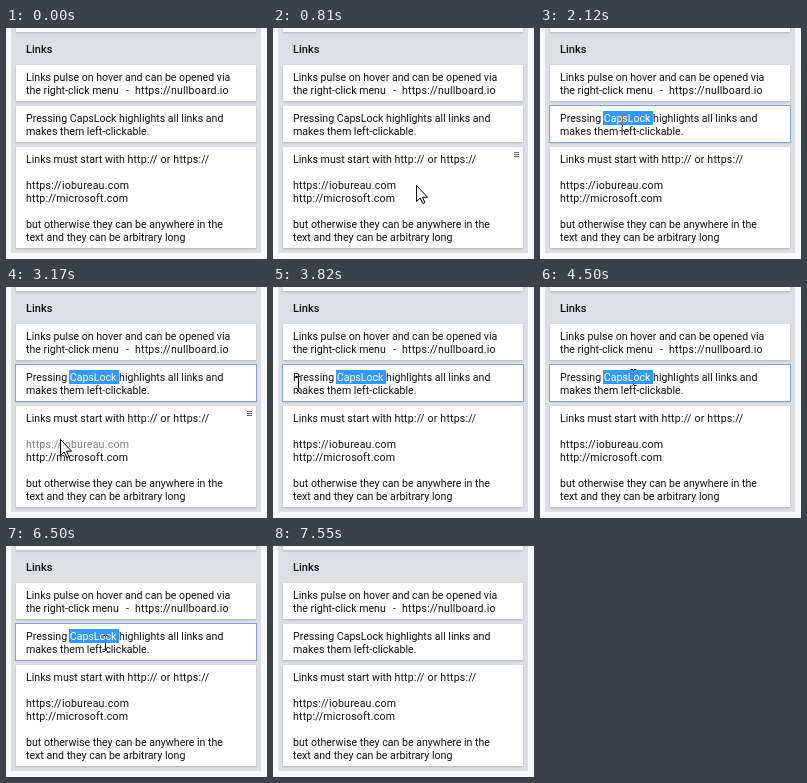
Recreate the animation shown at these times as an HTML page. Size 261 by 231 pixels, loop 8 s.

```html
<!DOCTYPE html>
<html lang="en">
<head>
<meta charset="utf-8">
<title>Links</title>
<style>
  html, body { margin: 0; width: 100%; height: 100%; overflow: hidden; background: #f7f9fc; }
  svg { display: block; width: 261px; height: 231px; }
  text { font: 10.6px Roboto, "Open Sans", sans-serif; fill: #111; white-space: pre; }
  .head { font-size: 11px; font-weight: 500; }
  .link { letter-spacing: .2px; }
  .card { fill: #fff; filter: drop-shadow(0 1px 1px rgba(0, 0, 0, .2)); }
  .menu { stroke: #666; }
  #beam { stroke: #fff; fill: none; mix-blend-mode: difference; }
  #arrow { stroke: #000; fill: #fff; }
</style>
</head>
<body>
<svg viewBox="0 0 261 231">
  <rect width="261" height="231" fill="#f7f9fc"/>
  <rect x="5" width="250" height="225" fill="#dcdfe4"/>
  <rect class="card" x="10" y="-20" width="240" height="24"/>
  <rect class="card" x="10" y="37" width="240" height="36"/>
  <rect class="card" x="10" y="78" width="240" height="36"/>
  <rect class="card" x="10" y="119" width="240" height="101"/>

  <text class="head" x="20" y="25">Links</text>
  <text x="20" y="53">Links pulse on hover and can be opened via</text>
  <text x="20" y="66">the right-click menu</text>
  <text x="120" y="66">-</text>
  <text class="link" x="129" y="66">https://nullboard.io</text>

  <g id="editor">
    <rect x="9.5" y="77.5" width="241" height="37" fill="#fff" stroke="#82a3d8"/>
    <rect x="63" y="83" width="50" height="14" fill="#3399ff"/>
  </g>
  <text x="20" y="94">Pressing <tspan id="word">CapsLock</tspan> highlights all links and</text>
  <text x="20" y="107">makes them left-clickable.</text>

  <text x="20" y="135">Links must start with <tspan class="link">http:// or https://</tspan></text>
  <text class="link" id="link" x="20" y="161">https://iobureau.com</text>
  <text class="link" x="20" y="174">http://microsoft.com</text>
  <text x="20" y="200">but otherwise they can be anywhere in the</text>
  <text x="20" y="213">text and they can be arbitrary long</text>

  <path class="menu" id="menuUpper" d="M241 83.5h5m-5 2h5m-5 2h5"/>
  <path class="menu" id="menuLower" d="M241 124.5h5m-5 2h5m-5 2h5"/>

  <path id="beam" d="M-3-7.5h2.5m1 0h2.5M0-7V8M-3 8.5h2.5m1 0h2.5"/>
  <path id="arrow" d="M.5.5v16l3.7-3.5 2.6 5.6 2.2-1-2.6-5.4h5.1z"/>
</svg>
<script>
const LOOP = 8000;
const ENTER = 500, LEAVE = 7550, EDIT_START = 2120, EDIT_END = 6910;

const ORIGIN = { x: 238, y: 245 };
const moves = [
  { from: ENTER, to: 1270, x: 90, y: 108 },
  { from: 1270, to: 1750, x: 82, y: 94 },
  { from: 2500, to: 3020, x: 54, y: 152 },
  { from: 3170, to: 4150, x: 21, y: 90 },
  { from: 4320, to: 5150, x: 206, y: 90 },
  { from: 5450, to: 5650, x: 99, y: 97 },
  { from: 6500, to: 6560, x: 99, y: 92 },
  { from: EDIT_END, to: LEAVE, x: 240, y: 130 }
];

const el = id => document.getElementById(id);
const show = (id, on) => el(id).setAttribute("visibility", on ? "visible" : "hidden");
const clamp = v => Math.min(1, Math.max(0, v));
const easeOut = k => 1 - (1 - k) ** 2;

function pointerAt(t) {
  let { x, y } = ORIGIN;
  for (const move of moves) {
    const k = easeOut(clamp((t - move.from) / (move.to - move.from)));
    x += (move.x - x) * k;
    y += (move.y - y) * k;
  }
  return [Math.round(x), Math.round(y)];
}

function draw(t) {
  const [x, y] = pointerAt(t);
  const visible = t >= ENTER && t < LEAVE;
  const editing = t >= EDIT_START && t < EDIT_END;
  const upper = visible && y >= 78 && y < 115;
  const lower = visible && y >= 119 && y < 220;
  const overLink = lower && x >= 20 && x < 123 && y >= 150 && y < 163;
  const typing = editing && upper;

  show("editor", editing);
  el("word").style.fill = editing ? "#fff" : "";
  el("link").style.fill = overLink ? "#7d8078" : "";
  show("menuUpper", upper && !editing);
  show("menuLower", lower);
  show("beam", typing);
  show("arrow", visible && !typing);
  el("beam").setAttribute("transform", `translate(${x + .5} ${y})`);
  el("arrow").setAttribute("transform", `translate(${x} ${y})`);
}

const start = performance.now();
function tick() {
  draw((performance.now() - start) % LOOP);
  requestAnimationFrame(tick);
}
tick();
</script>
</body>
</html>
```
